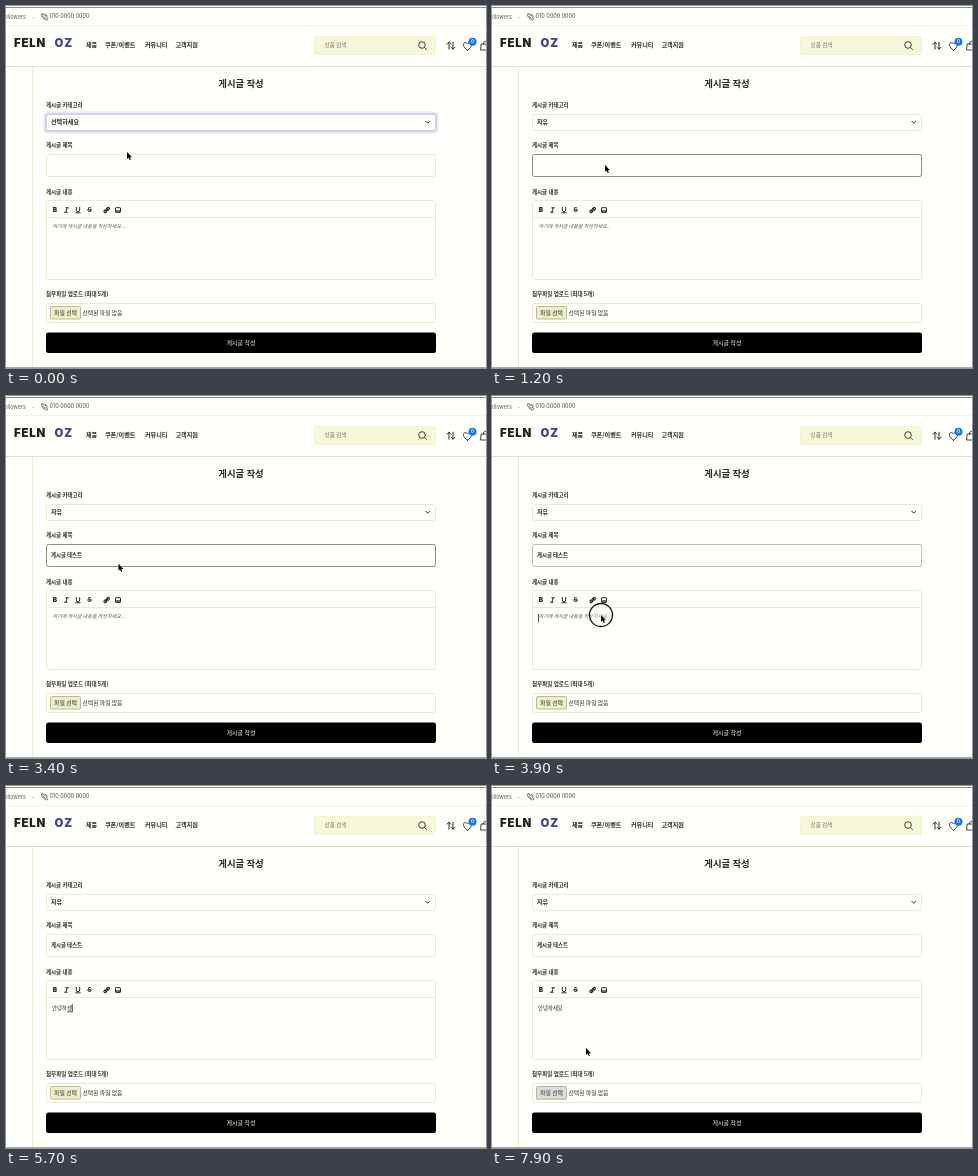
These frames come from a looping animation (480 px wide and 362 px high, 8 s). An HTML page with a canvas:

```html
<!DOCTYPE html>
<html lang="ko">
<head>
<meta charset="utf-8">
<title>게시글 작성</title>
<style>
html, body { margin: 0; width: 100%; height: 100%; overflow: hidden; background: #fffffb; }
canvas { display: block; width: 480px; height: 362px; }
</style>
</head>
<body>
<canvas id="stage"></canvas>
<script>
const W = 480, H = 362, LOOP = 8000;
const KR = '"Noto Sans CJK KR", "Noto Sans CJK", "Noto Sans", sans-serif';
const LATIN = 'Inter, "Open Sans", sans-serif';
const INK = '#2b2b22', SOFT = '#ececcb', PAGE = '#fffffb';

const canvas = document.getElementById('stage');
const c = canvas.getContext('2d');
const dpr = window.devicePixelRatio || 1;
canvas.width = W * dpr;
canvas.height = H * dpr;

// pointer stops: time, x, y
const path = [
  [0, 121, 146], [250, 121, 146], [600, 113, 159], [3300, 113, 159],
  [3720, 109, 219], [6200, 109, 219], [6700, 82, 259], [7100, 58, 308],
  [7560, 58, 308], [7880, 94, 262], [8000, 94, 262]
];
const hiddenSpans = [[1500, 3250], [4450, 6150]];
const clicks = [650, 3750, 7240];
const CLICK_MS = 300;

// Each entry is the text after one key press
const titleKeys = {
  start: 1500, gap: 106,
  steps: ['ㄱ', '게', '겟', '게시', '게식', '게시그', '게시글', '게시글 ', '게시글 ㅌ',
    '게시글 테', '게시글 텟', '게시글 테스', '게시글 테슽', '게시글 테스트']
};
const bodyKeys = {
  start: 4500, gap: 120,
  steps: ['ㅇ', '아', '안', '안ㄴ', '안녀', '안녕', '안녕ㅎ', '안녕하', '안녕핫',
    '안녕하세', '안녕하셍', '안녕하세요']
};

const clamp = v => Math.max(0, Math.min(1, v));
const within = (t, a, b) => t >= a && t < b;

function text(s, x, y, size, o = {}) {
  c.font = `${o.style || ''} ${o.weight || 500} ${size}px ${o.font || KR}`;
  c.textAlign = o.align || 'left';
  c.textBaseline = 'alphabetic';
  c.letterSpacing = (o.space || 0) + 'px';
  c.fillStyle = o.color || INK;
  c.fillText(s, x, y + size * 0.37);
  const width = c.measureText(s).width;
  c.letterSpacing = '0px';
  return width;
}

function box(x, y, w, h, stroke, fill, r = 2, lw = 1) {
  c.beginPath();
  c.roundRect(x, y, w, h, r);
  if (fill) { c.fillStyle = fill; c.fill(); }
  if (stroke) { c.strokeStyle = stroke; c.lineWidth = lw; c.stroke(); }
}

function line(points, color, lw = 1) {
  c.beginPath();
  points.forEach(([x, y], i) => i ? c.lineTo(x, y) : c.moveTo(x, y));
  c.strokeStyle = color;
  c.lineWidth = lw;
  c.stroke();
}

function circle(x, y, r, stroke, lw, fill) {
  c.beginPath();
  c.arc(x, y, r, 0, Math.PI * 2);
  if (fill) { c.fillStyle = fill; c.fill(); }
  if (stroke) { c.strokeStyle = stroke; c.lineWidth = lw; c.stroke(); }
}

function pathIcon(d, x, y, lw, color = INK) {
  c.save();
  c.translate(x, y);
  c.strokeStyle = color;
  c.lineWidth = lw;
  c.lineJoin = c.lineCap = 'round';
  c.stroke(new Path2D(d));
  c.restore();
}

function header() {
  line([[0, 1.5], [W, 1.5]], '#8c8c82');
  text('ollowers', -1.8, 10.5, 5.5, { font: LATIN, weight: 400, color: '#66665a' });
  text('-', 25.5, 10.5, 5.5, { font: LATIN, color: '#99998c' });
  pathIcon('M-2.6-2.6l1.3-.3 1 1.7-.9.9a5 5 0 0 0 1.9 1.9l.9-.9 1.7 1-.3 1.3q-1 .7-2.6-.3-2.3-1.4-3.2-3.5-.4-1.2.2-1.8zM.6-2.7a3 3 0 0 1 2.2 2.2M.7-1.3a1.4 1.4 0 0 1 .8.8', 38.5, 10.7, 0.8, '#55554c');
  text('010 0000 0000', 43.5, 10.3, 5.5, { font: LATIN, weight: 400, color: '#55554a' });
  line([[0, 19.5], [W, 19.5]], '#f4f4df');

  text('FELN', 8, 37.2, 11.4, { font: LATIN, weight: 900, space: 0.8, color: '#20201c' });
  text('OZ', 48.5, 37.2, 11.4, { font: LATIN, weight: 900, space: 0.8, color: '#3f4786' });
  const nav = [['제품', 80], ['쿠폰/이벤트', 99], ['커뮤니티', 139], ['고객지원', 169.5]];
  nav.forEach(([s, x]) => text(s, x, 39.2, 6.1, { weight: 700 }));

  box(308.5, 30.5, 121, 18, '#f3f3d2', '#f7f7da', 1);
  text('상품 검색', 318.5, 39.3, 5.6, { color: '#77776a' });
  circle(416, 39, 3.3, INK, 0.9);
  line([[418.4, 41.4], [420.8, 43.8]], INK, 0.9);

  pathIcon('M-2 3.5V-3.5M-4-1.5l2-2 2 2M2-3.5V3.5M0 1.5l2 2 2-2', 445, 39.7, 1);
  pathIcon('M0 4C-6-.2-4.3-4-2-3.7-.8-3.6 0-2.3 0-2.3S.8-3.6 2-3.7C4.3-4 6-.2 0 4Z', 461.5, 40.3, 0.9);
  circle(466.5, 35.8, 4, null, 0, '#1479ef');
  text('0', 466.5, 35.8, 4.5, { font: LATIN, weight: 600, align: 'center', color: '#fff' });
  pathIcon('M-3-1.5H5V4.5H-3.5ZM-1-1.5V-2.5Q-.6-4.5 2-4.5', 478.5, 39.5, 0.9);
  line([[0, 60.5], [W, 60.5]], '#e2e2c2');
  line([[26.5, 61], [26.5, H]], SOFT);
  line([[0, 361.5], [W, 361.5]], '#a8a89a');
}

function toolbar() {
  const y = 204;
  text('B', 49, y, 6.6, { font: LATIN, weight: 900, align: 'center' });
  pathIcon('M-.7-2.2H1.9M-1.9 2.2H.7M.6-2.2L-.6 2.2', 60.5, y, 1);
  pathIcon('M-1.7-2.6V0a1.7 1.7 0 0 0 3.4 0V-2.6M-2.2 2.8H2.2', 72, y, 1);
  text('S', 83.5, y, 6.3, { font: LATIN, weight: 700, align: 'center' });
  line([[80.8, y], [86.2, y]], INK, 0.8);
  pathIcon('M-1 1L1-1M-.2-1.3l1-1a1.1 1.1 0 0 1 1.6 1.6l-1 1M.2 1.3l-1 1a1.1 1.1 0 0 1-1.6-1.6l1-1', 100.7, y, 1.2);
  box(109.5, y - 2.3, 5, 4.6, INK, null, 0.4, 1);
  pathIcon('M-2 1.7l1.5-1.7 1 1 .6-.6L2 1.7Z', 112, y, 1);
}

// Typed text with the composing underline and a blinking caret
function typed(keys, t, x, y, weight, focusAt, blurAt) {
  const last = keys.steps.length - 1;
  const n = Math.min(last, Math.floor((t - keys.start) / keys.gap));
  const s = n < 0 ? '' : keys.steps[n];
  const end = x + text(s, x, y, 5.4, { weight });
  const lastKey = keys.start + last * keys.gap;
  if (n >= 0 && t < lastKey + 350 && !s.endsWith(' ')) {
    line([[end - c.measureText(s.slice(-1)).width, y + 3.8], [end, y + 3.8]], INK, 0.8);
  }
  if (within(t, focusAt, blurAt)) {
    const typing = within(t, keys.start, lastKey);
    const since = t - (t < keys.start ? focusAt : lastKey);
    if (typing || since % 1000 < 500) {
      line([[end + 0.5, y - 4], [end + 0.5, y + 4.5]], INK, 0.8);
    }
  }
  return n >= 0;
}

function form(t) {
  text('게시글 작성', 235, 77.8, 9.4, { weight: 700, align: 'center' });
  const labels = [['게시글 카테고리', 99], ['게시글 제목', 139], ['게시글 내용', 185.5]];
  labels.forEach(([s, y]) => text(s, 40, y, 5.5, { weight: 700 }));
  text('첨부파일 업로드 (최대 5개)', 40, 287.8, 5.55, { weight: 700 });

  const selectGlow = 1 - clamp((t - 650) / 150);
  box(40.5, 108.5, 389, 16, SOFT, PAGE);
  if (selectGlow > 0) {
    c.globalAlpha = selectGlow;
    box(38.5, 106.5, 393, 20, '#e8eaf6', null, 3, 2);
    box(40, 108, 390, 17, '#aeb7dc', null, 2, 1);
    c.globalAlpha = 1;
  }
  text(t < 250 ? '선택하세요' : '자유', 45, 116, 6.1, { weight: 700 });
  pathIcon('M-1.9-.9L0 1L1.9-.9', 421.7, 116.2, 1);

  box(40.5, 148.5, 389, 22, SOFT, PAGE);
  const titleFocus = clamp((t - 650) / 150) * (1 - clamp((t - 3800) / 200));
  if (titleFocus > 0) {
    c.globalAlpha = titleFocus;
    box(40.5, 148.5, 389, 22, '#8e8e7c');
    c.globalAlpha = 1;
  }
  typed(titleKeys, t, 45, 159.5, 700, 650, 3750);

  box(40.5, 194.5, 389, 79, SOFT, PAGE);
  line([[41, 211.5], [429, 211.5]], SOFT);
  toolbar();
  if (!typed(bodyKeys, t, 46, 222, 500, 3750, 7240)) {
    text('여기에 게시글 내용을 작성하세요...', 46.5, 220.5, 5.05, { style: 'italic', color: '#5c5c4c' });
  }

  box(40.5, 297.5, 389, 19, SOFT, PAGE);
  const hover = clamp((t - 7040) / 150);
  box(44.5, 300.5, 30, 12.5, '#bcbc90', '#eeeecb', 1);
  if (hover > 0) {
    c.globalAlpha = hover;
    box(44.5, 300.5, 30, 12.5, '#b4b4a4', '#dededa', 1);
    c.globalAlpha = 1;
  }
  text('파일 선택', 59.5, 306.6, 5.9, { align: 'center' });
  text('선택된 파일 없음', 76.5, 306.6, 5.8);

  box(40, 326.5, 390, 20.5, null, '#000', 2.5);
  text('게시글 작성', 235, 336.7, 6, { align: 'center', color: '#f4f4d8' });
}

function pointerAt(t) {
  const i = Math.max(1, path.findIndex(p => p[0] > t));
  const [t0, x0, y0] = path[i - 1], [t1, x1, y1] = path[i];
  const u = clamp((t - t0) / (t1 - t0));
  const e = u * u * (3 - 2 * u);
  return [x0 + (x1 - x0) * e, y0 + (y1 - y0) * e];
}

function pointer(t) {
  if (hiddenSpans.some(([a, b]) => within(t, a, b))) return;
  const [x, y] = pointerAt(t);
  if (clicks.some(k => within(t, k, k + CLICK_MS))) {
    circle(x, y, 11.5, '#11110f', 1.3, 'rgba(255,255,240,.3)');
  }
  c.save();
  c.translate(x, y);
  const arrow = new Path2D('M0 0V7L1.6 5.6L2.7 8.1L3.9 7.6L2.9 5.2H5Z');
  c.lineJoin = 'round';
  c.strokeStyle = '#fff';
  c.lineWidth = 1;
  c.stroke(arrow);
  c.fillStyle = '#000';
  c.fill(arrow);
  c.restore();
}

function draw(t) {
  c.setTransform(dpr, 0, 0, dpr, 0, 0);
  c.fillStyle = PAGE;
  c.fillRect(0, 0, W, H);
  header();
  form(t);
  pointer(t);
}

const start = performance.now();
function tick() {
  draw((performance.now() - start) % LOOP);
  requestAnimationFrame(tick);
}
tick();
</script>
</body>
</html>
```
